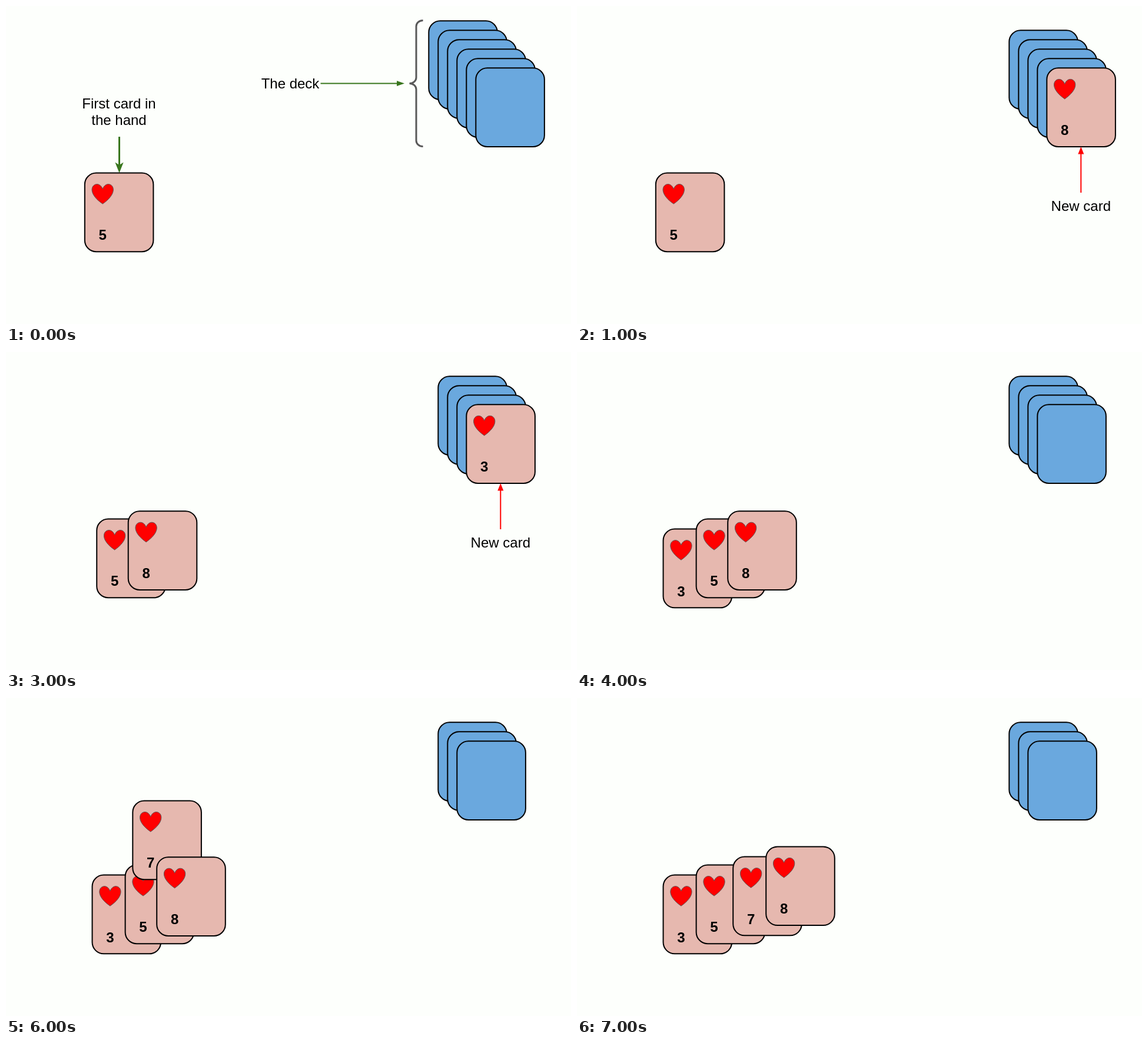
An HTML page for the animation above (8 s loop, 960 by 540 pixels).

```html
<!DOCTYPE html>
<html lang="en">
<head>
<meta charset="utf-8">
<title>Sorting a hand of cards</title>
<style>
  html, body { margin: 0; width: 100%; height: 100%; overflow: hidden; background: #fdfffc; }
  svg { display: block; width: 100%; height: 100%; }
  text { font-family: "Liberation Sans", Arial, sans-serif; font-size: 24px; text-anchor: middle; }
  .num { font-weight: bold; }
  .card { stroke: #000; stroke-width: 2; }
  .heart { fill: #f00; stroke: #595959; stroke-width: 1; }
  .brace { fill: none; stroke: #595959; stroke-width: 3; }
</style>
</head>
<body>
<svg id="stage" viewBox="0 0 960 540"></svg>
<script>
const STEP = 1000;
const W = 116.6, H = 133.7;
const BLUE = '#6aa8de', PINK = '#e6b8af', GREEN = '#38761d', RED = '#f00';
const stage = document.getElementById('stage');

const label = (x, y, s, cls = '') => `<text class="${cls}" x="${x}" y="${y}">${s}</text>`;
const line = (d, color, w) => `<path d="${d}" fill="none" stroke="${color}" stroke-width="${w}"/>`;
const shape = (d, color) => `<path d="${d}" fill="${color}"/>`;

const blank = (x, y, fill) =>
  `<rect class="card" x="${x}" y="${y}" width="${W}" height="${H}" rx="19.5" fill="${fill}"/>`;

// Heart in a 36 x 34 box, centred on x = 0
const HEART = 'M0 8.5C7.5 -11.3 36.8 8.5 0 34C-36.8 8.5 -7.5 -11.3 0 8.5Z';

const face = ([n, x, y]) => blank(x, y, PINK) +
  `<path class="heart" transform="translate(${x + 30.4} ${y + 18.6})" d="${HEART}"/>` +
  label(x + 30.4, y + 113.9, n, 'num');

const slot = i => [718.3 + 16 * i, 25.3 + 16 * i];

function deck(from, to) {
  let s = '';
  for (let i = from; i <= to; i++) s += blank(...slot(i), BLUE);
  return s;
}

// Turned-up card on the deck with its red arrow and caption
function drawn(n, i, drop = 0) {
  const [x, y] = slot(i), cx = x + 58, tip = y + H;
  return face([n, x, y]) +
    line(`M${cx} ${tip + 78}V${tip + 11}`, RED, 2) +
    shape(`M${cx} ${tip}l5 12.5h-10Z`, RED) +
    label(cx, y + 242.6 + drop, 'New card');
}

const hand = (...cards) => cards.map(face).join('');

const intro = label(192, 173.5, 'First card in') + label(192, 202.3, 'the hand') +
  line('M192.5 222V272', GREEN, 3) +
  shape('M192.5 283.5L185.4 265.5L192.5 270L199.6 265.5Z', GREEN) +
  label(483, 140, 'The deck') +
  line('M534.5 131.5H665', GREEN, 2) +
  shape('M677 131.5l-13 -4.4v8.8Z', GREEN) +
  '<path class="brace" d="M708.5 24.5A11.5 10 0 0 0 697 34.5V121.5A11.5 10 0 0 1 685.5 131.5' +
  'A11.5 10 0 0 1 697 141.5V228.5A11.5 10 0 0 0 708.5 238.5"/>';

const one = hand([5, 133.8, 283.5]);
const two = hand([5, 154.2, 283.5], [8, 207.7, 270.2]);
const low = [[3, 146.5, 300.6], [5, 202.6, 283.5]];
const mid = [8, 256.2, 270.2];
const three = hand(...low, mid);

const scenes = [
  deck(0, 5) + intro + one,
  deck(1, 4) + drawn(8, 5) + one,
  deck(1, 4) + two,
  deck(1, 3) + drawn(3, 4) + two,
  deck(1, 4) + three,
  deck(1, 2) + drawn(7, 3, 1.5) + three,
  deck(1, 3) + hand(...low, [7, 215.3, 174.5], mid),
  deck(1, 3) + hand(...low, [7, 265.2, 269.6], [8, 321.2, 252.4])
];

let shown = -1;
function draw(t) {
  const i = Math.floor(t / STEP) % scenes.length;
  if (i !== shown) stage.innerHTML = scenes[shown = i];
}

const start = performance.now();
function tick() {
  draw(performance.now() - start);
  requestAnimationFrame(tick);
}
tick();
</script>
</body>
</html>
```
